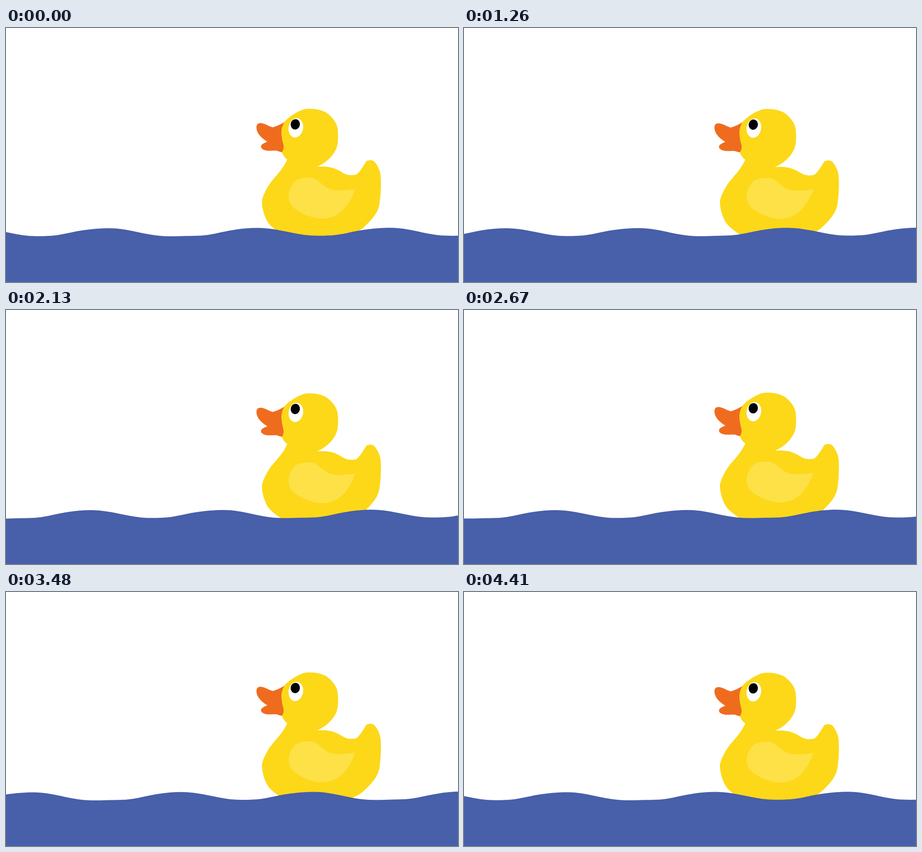
An HTML page for the animation above (4440 ms loop, 998 px wide and 561 px high).

```html
<!DOCTYPE html>
<html lang="en">
<head>
<meta charset="utf-8">
<title>Rubber duck</title>
<style>
  html, body { margin: 0; width: 100%; height: 100%; overflow: hidden; background: #fff; }
  svg { display: block; width: 100vw; height: 100vh; }
</style>
</head>
<body>
<svg viewBox="0 0 998 561" preserveAspectRatio="none">
  <g id="duck">
    <path fill="#fcd819" d="M621 290.5C615 286 611 280 608 272L608 215L614 208
      C624 196 645 183 660 179C675 176.5 695 180 706 186C718 194 728 206 731 217
      C734 228 734 250 731 261C727 277 709 298 686 306.5C718 304 731 312 744 320
      C753 325.5 762 326 773 324C781 319 790 303 796 293.5C803 291.5 808 291 812 294
      C819 300 826 314 827 325C828.5 340 828 365 825 385C823 405 812 420 788 442
      C775 452 757 460 735 465L625 465C612 458 592 445 582 434
      C570 420 565 396 565 382C567 370 576 352 586 339C598 324 612 311 621 290.5Z"/>
    <path fill="#fde147" d="M771.5 355.5C750 359 732 359 722 357.5C705 355 696 341 683 333.5
      C672 328 652 331 642 336C630 344 624 360 624 371C624 384 630 393 639 400
      C655 411 678 421 697 421C738 421 759 389 771.5 355.5Z"/>
    <path fill="#ef6c1f" d="M614.5 208C606 213 598 217 589 219.5C580 217 570 210 562 210
      C555 210 553.5 214 553 219C553 234 566 244 577 251C570 254 563 257 563 262
      C563 267 570 270 577 271C585 271.5 597 269.5 602 272.5C606 274 608 274 609.5 274
      C613 268 614 262 612 256C609 245 608 235 608 228C609 220 611 214 614.5 208Z"/>
    <ellipse fill="#fff" rx="16" ry="21.5" transform="translate(640 220.4) rotate(10)"/>
    <ellipse fill="#000" rx="10.2" ry="11.4" transform="translate(638.7 212.8) rotate(10)"/>
  </g>
  <g transform="translate(230 0) skewY(-0.1) translate(-230 0)">
    <path id="sea" fill="#485fa9"/>
  </g>
</svg>
<script>
  const LOOP = 4440, STEP = 30, TILE = 620;
  const duck = document.getElementById('duck');
  const sea = document.getElementById('sea');

  // One swell pair, repeated along the surface
  const swell = 'c40 0 78 16 120 17.6c15 .6 32 .4 49 -.4c26 0 41 -.7 61 -4.7' +
    'c35 -7.5 60 -12.8 95 -12.8c45 0 85 16.3 125 17.3c10 .3 20 .3 32 -.3' +
    'c27 -.6 48 -7.7 73 -11.6c23 -3.5 43 -5.1 65 -5.1';
  sea.setAttribute('d', `M${230 - 2 * TILE} 442.3${swell.repeat(4)}V600H${230 - 2 * TILE}Z`);

  // Uneven drift of the water: [ms, px]
  const drift = [[0, 0], [540, 60], [780, 88], [1080, 131], [1260, 158], [1620, 190],
    [2130, 252], [2700, 268], [3120, 367], [3240, 418], [3870, 507], [4320, 610],
    [4410, TILE], [LOOP, TILE]];
  // The duck bobs twice per tile: [px of drift, px down]
  const bob = [[0, 0], [70.5, -6.9], [236, 7.3], [TILE / 2, 0]];

  function lerp(points, x) {
    const i = Math.max(1, points.findIndex(p => p[0] >= x));
    const [x0, y0] = points[i - 1], [x1, y1] = points[i];
    return y0 + (y1 - y0) * (x - x0) / (x1 - x0);
  }

  function draw() {
    const t = Math.floor(performance.now() % LOOP / STEP) * STEP;
    const x = lerp(drift, t);
    sea.setAttribute('transform', `translate(${x} 0)`);
    duck.setAttribute('transform', `translate(0 ${lerp(bob, x % (TILE / 2))})`);
    requestAnimationFrame(draw);
  }
  draw();
</script>
</body>
</html>
```
